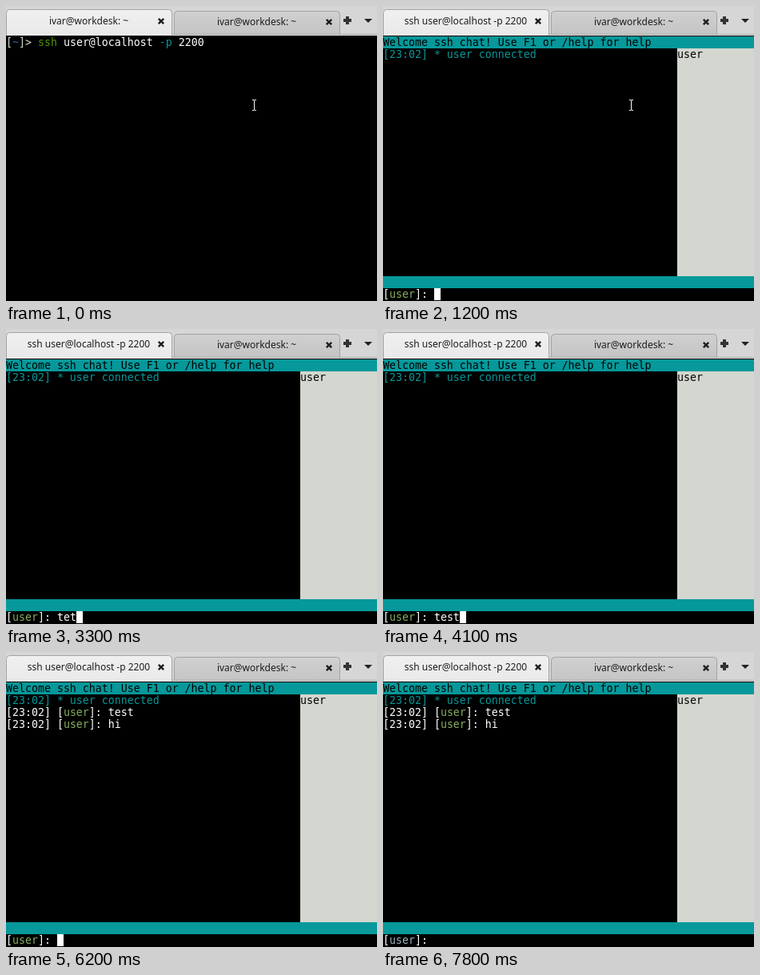
An HTML page that plays this animation: 464x369 px, repeating every 8000 ms.

```html
<!DOCTYPE html>
<html lang="en">
<head>
<meta charset="utf-8">
<style>
html, body { margin: 0; width: 100%; height: 100%; overflow: hidden; background: #000; }
svg { position: absolute; left: 0; top: 0; }
.title { position: absolute; width: 207px; text-align: center; color: #1c1c1c; white-space: pre;
  font: 12px/16px "Noto Sans", "Open Sans", sans-serif; }
#term { position: absolute; left: 0; top: 38px; width: 464px; height: 330px; overflow: hidden; color: #fff; }
.row { position: absolute; height: 15px; white-space: pre;
  font: 13.289px/15px "DejaVu Sans Mono", monospace; }
.box { position: absolute; }
.grey { color: #d3d7cf } .blue { color: #3465a4 } .cmd { color: #4e9a06 }
.teal { color: #06989a } .nick { color: #87af5f } .pale { color: #9ab4be } .dark { color: #000 }
</style>
</head>
<body>
<svg width="464" height="369">
  <defs>
    <linearGradient id="front" x2="0" y2="1"><stop stop-color="#f0f0f0"/><stop offset="1" stop-color="#e9e9e9"/></linearGradient>
    <linearGradient id="back" x2="0" y2="1"><stop stop-color="#d0d0d0"/><stop offset="1" stop-color="#c4c4c4"/></linearGradient>
    <path id="close" d="M-3.2-3.2 3.2 3.2M3.2-3.2-3.2 3.2" stroke="#1e1e1e" stroke-width="2.4"/>
  </defs>
  <path fill="#d6d6d6" d="M0 0H464V37H0z"/>
  <path fill="url(#back)" stroke="#a3a3a3" d="M210.5 36V10.500q0-4 4-4H413.500q4 0 4 4V36"/>
  <path fill="#a8a8a8" d="M208 35H464V36H208z"/>
  <path fill="#e9e9e9" d="M0 36H464V37H0z"/>
  <path fill="url(#front)" stroke="#a3a3a3" d="M.5 36.500V8.500q0-4 4-4H203.500q4 0 4 4V36.500"/>
  <use href="#close" x="194" y="19"/>
  <use href="#close" x="404" y="20"/>
  <path d="M427 13V23M422 18H432" stroke="#333" stroke-width="4"/>
  <path d="M448 16H458L453 21z" fill="#222"/>
</svg>
<div class="title" id="title" style="left:0;top:11px"></div>
<div class="title" style="left:210px;top:12px">ivar@workdesk: ~</div>
<div id="term"></div>
<svg id="mouse" width="464" height="369">
  <path d="M308 117.500H310L310.500 118 311 117.500H313M310.500 118V130M308 130.500H310L310.500 130 311 130.500H313"
    fill="none" stroke="#fff"/>
</svg>
<script>
const $ = id => document.getElementById(id);
const span = (color, text) => `<span class="${color}">${text}</span>`;
const row = (line, html, col = 0) =>
  `<div class="row" style="left:${col * 8}px;top:${line * 15}px">${html}</div>`;
const box = (x, y, w, h, color) =>
  `<div class="box" style="left:${x}px;top:${y}px;width:${w}px;height:${h}px;background:${color}"></div>`;
const cursor = (col, line) => box(col * 8, line * 15, 8, 15, '#fff');

const command = span('grey', '[') + span('blue', '~') + span('grey', ']&gt; ') +
  span('cmd', 'ssh') + ' user@localhost ' + span('teal', '-p') + ' 2200';

// start time, typed text, cursor shown
const prompt = [
  [1200, '', 1], [1700, '', 0], [2300, '', 1], [2800, 't', 1], [2900, 'te', 1],
  [3300, 'tet', 1], [3700, 'te', 1], [3900, 'tes', 1], [4100, 'test', 1], [4600, '', 1],
  [5100, '', 0], [5400, '', 1], [5500, 'h', 1], [5700, 'hi', 1], [6200, '', 1],
  [6800, '', 0], [7200, '', 1], [7800, '', 0]
];
const messages = [[4600, 'test'], [6200, 'hi']];

function shell(t) {
  const block = t < 400 ? '' : t < 1000 ? cursor(31, 0) : cursor(0, 1);
  return row(0, command) + block;
}

function chat(t) {
  const [, text, lit] = prompt.findLast(p => p[0] <= t);
  const sent = messages.filter(m => m[0] <= t).map(([, msg], i) =>
    row(2 + i, `[23:02] [${span('nick', 'user')}]: ${msg}`)).join('');
  return box(0, 0, 464, 15, '#06989a') + box(0, 300, 464, 15, '#06989a') +
    box(368, 15, 96, 285, '#d3d7cf') +
    row(0, span('dark', 'Welcome ssh chat! Use F1 or /help for help')) +
    row(1, span('teal', '[23:02] * user connected')) +
    row(1, span('dark', 'user'), 46) + sent +
    row(21, `[${span(t < 7200 ? 'nick' : 'pale', 'user')}]: ${text}`) +
    (lit ? cursor(8 + text.length, 21) : '');
}

let shown = '';
function draw() {
  const t = performance.now() % 8000;
  const screen = t < 1200 ? shell(t) : chat(t);
  if (screen !== shown) $('term').innerHTML = shown = screen;
  $('title').textContent = t < 1100 ? 'ivar@workdesk: ~' : 'ssh user@localhost -p 2200';
  $('mouse').style.display = t < 1000 || t >= 1200 && t < 2800 ? '' : 'none';
  requestAnimationFrame(draw);
}
draw();
</script>
</body>
</html>
```
